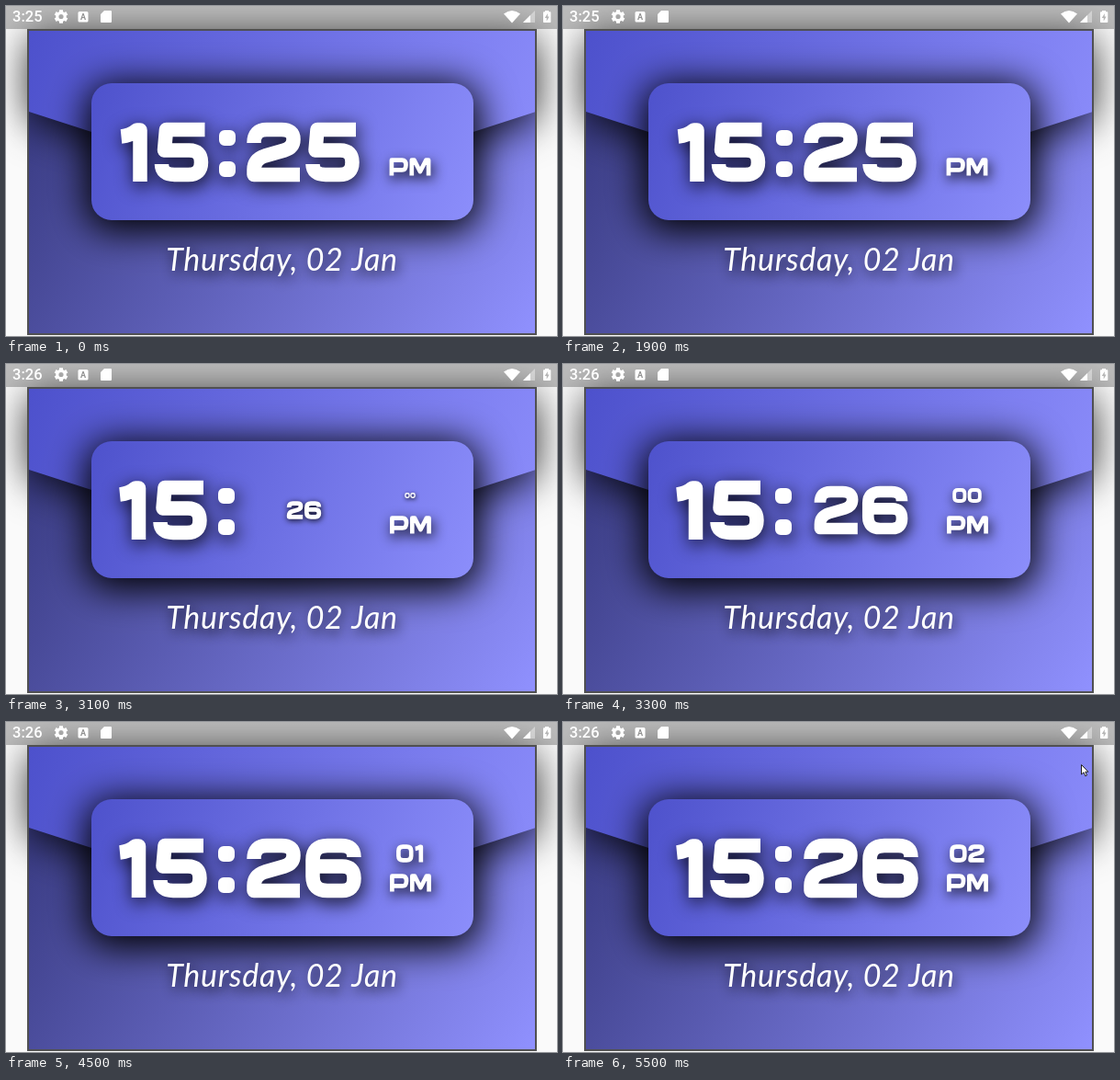
Write an HTML page with a canvas that moves like this. It is 600 px wide and 359 px high and loops after 5.7 s.

```html
<!DOCTYPE html>
<html lang="en">
<head>
<meta charset="utf-8">
<title>Clock</title>
<style>
html, body { margin: 0; width: 100%; height: 100%; overflow: hidden; background: #fafafa; }
canvas { display: block; width: 600px; height: 359px; }
</style>
</head>
<body>
<canvas id="stage" width="600" height="359"></canvas>
<script>
const W = 600, H = 359, LOOP = 5700, STEP = 100, GROW = 550;
const ctx = document.getElementById('stage').getContext('2d');

// Centre lines of the wide display letters: 64 units high, 15 thick
const GLYPHS = {
  0: [62, 'M24 7.5H38Q54 7.5 54 23V41Q54 56.5 38 56.5H24Q8 56.5 8 41V23Q8 7.5 24 7.5Z'],
  1: [33, 'M22.5 64V8H19Q12 14 2 15'],
  2: [59, 'M8 22Q8 7.5 22 7.5H38Q51 7.5 51 18Q51 27 41 30L20 36Q8 40 8 51V56.5H58'],
  5: [59, 'M55 7.5H13L11 30H38Q51 30 51 43Q51 56.5 37 56.5H22Q8 56.5 8 45'],
  6: [61, 'M53 20Q53 7.5 39 7.5H24Q8 7.5 8 23V41Q8 56.5 24 56.5H40Q53 56.5 53 43Q53 30 40 30H8'],
  7: [57, 'M1 7.5H50V12L24 64'],
  8: [60, 'M20 7.5H40Q50 7.5 50 19Q50 31 40 31H20Q10 31 10 19Q10 7.5 20 7.5ZM20 31H40Q52 31 52 44Q52 56.5 40 56.5H20Q8 56.5 8 44Q8 31 20 31Z'],
  9: [61, 'M8 44Q8 56.5 22 56.5H37Q53 56.5 53 41V23Q53 7.5 37 7.5H21Q8 7.5 8 21Q8 34 21 34H53'],
  P: [68, 'M8 64V7.5H46Q60 7.5 60 25Q60 43 46 43H8'],
  M: [77, 'M8 64V7.5H17L38.5 49L60 7.5H69V64']
};
const GAP = 5;

const TICKS = [
  { at: -30, sec: '57' }, { at: 945, sec: '58' }, { at: 1900, sec: '59' },
  { at: 2900, sec: '00' }, { at: 3950, sec: '01' }, { at: 4690, sec: '02' }
];
const MINUTE = 2900;

const POINTER_START = 4900;
const POINTER = [[594, 200], [134, 234], [400, 110], [574, 54], [568, 48], [565, 46], [564, 46]];

function setShadow(c, x, y, blur, alpha) {
  c.shadowColor = `rgba(0,0,0,${alpha})`;
  c.shadowOffsetX = x;
  c.shadowOffsetY = y;
  c.shadowBlur = blur;
}

function slope(c, x0, y0, x1, y1, from, to) {
  const g = c.createLinearGradient(x0, y0, x1, y1);
  g.addColorStop(0, from);
  g.addColorStop(1, to);
  return g;
}

function fillPath(c, d, color) {
  c.fillStyle = color;
  c.fill(new Path2D(d), 'evenodd');
}

function word(text) {
  const path = new Path2D();
  let x = 0;
  for (const ch of text) {
    const [w, d] = GLYPHS[ch];
    path.addPath(new Path2D(d), new DOMMatrix([1, 0, 0, 1, x, 0]));
    x += w + GAP;
  }
  return { path, width: x - GAP };
}

function drawWord(c, text, cx, cy, size, grow = 1) {
  const s = size * grow;
  if (s < 0.004) return;
  const { path, width } = word(text);
  c.save();
  setShadow(c, 2 * grow, 5 * grow, (size < 1 ? 14 : 20) * grow, 0.9);
  c.translate(cx, cy);
  c.scale(s, s);
  c.translate(-width / 2, -32);
  c.strokeStyle = '#fff';
  c.lineWidth = 15.5;
  c.lineJoin = 'round';
  c.stroke(path);
  c.restore();
}

function drawColon(c, x) {
  c.save();
  setShadow(c, 2, 5, 20, 0.9);
  c.fillStyle = '#fff';
  c.beginPath();
  c.roundRect(x, 135, 18, 17, 6);
  c.roundRect(x, 169, 18, 17, 6);
  c.fill();
  c.restore();
}

function drawGear(c, x, y) {
  c.save();
  c.translate(x, y);
  c.fillStyle = '#fff';
  for (let i = 0; i < 6; i++) {
    c.fillRect(-2, -7.3, 4, 4);
    c.rotate(Math.PI / 3);
  }
  c.strokeStyle = '#fff';
  c.lineWidth = 3.2;
  c.beginPath();
  c.arc(0, 0, 4.2, 0, 7);
  c.stroke();
  c.restore();
}

function drawStatus(c) {
  c.fillStyle = 'rgba(0,0,0,.25)';
  c.fillRect(0, 0, W, 25);
  drawGear(c, 60, 11.5);
  c.fillStyle = '#fff';
  c.beginPath();
  c.roundRect(78.5, 6, 11, 11.5, 1.5);
  c.fill();
  c.fillStyle = '#8f8f8f';
  c.font = '700 9px Roboto, sans-serif';
  c.textAlign = 'center';
  c.fillText('A', 84, 15);
  fillPath(c, 'M107 5H114Q115 5 115 6V17Q115 18 114 18H104Q103 18 103 17V9Z', '#fff');
  fillPath(c, 'M542 8.5Q551 1.5 560 8.5L551 18.5Z', '#fff');
  fillPath(c, 'M576 5V18H563Z', 'rgba(255,255,255,.4)');
  fillPath(c, 'M571 10V18H563Z', '#fff');
  fillPath(c, 'M587 5H591V6.3H592.5Q593.3 6.3 593.3 7V17.2Q593.3 18 592.5 18H585.8Q585 18 585 17.2V7Q585 6.3 585.8 6.3H587Z M589.8 8L586.8 13H588.7V16.5L591.6 11.5H589.8Z', '#fff');
}

function drawBack(c) {
  c.fillStyle = '#fafafa';
  c.fillRect(0, 0, W, H);
  c.fillStyle = slope(c, 25, 27, 577, 357, '#33357a', '#9091ff');
  c.fillRect(24, 26, 553, 331);

  // Envelope flap
  c.save();
  setShadow(c, 0, 8, 44, 0.85);
  fillPath(c, 'M25 27H577V115L301 204L25 115Z', slope(c, 25, 27, 577, 204, '#4d51cc', '#8c8dfb'));
  c.restore();

  c.strokeStyle = '#505052';
  c.lineWidth = 2;
  c.strokeRect(24, 26, 553, 331);
  drawStatus(c);
}

function drawCard(c) {
  // Shadow alone, cast by a slightly larger plate outside the stage
  c.save();
  setShadow(c, 0, 1006, 40, 1);
  c.beginPath();
  c.roundRect(87, 78 - 1000, 428, 161, 28);
  c.fill();
  c.restore();

  c.fillStyle = slope(c, 93, 84, 509, 233, '#4e52cc', '#8c8efb');
  c.beginPath();
  c.roundRect(93, 84, 416, 149, 22);
  c.fill();
}

function drawDate(c) {
  c.save();
  setShadow(c, 2, 5, 14, 0.85);
  c.fillStyle = '#fff';
  c.font = 'italic 400 34px Lato, sans-serif';
  c.letterSpacing = '0.7px';
  c.textAlign = 'center';
  c.fillText('Thursday, 02 Jan', 300.5, 288);
  c.restore();
}

function buildScene() {
  const layer = document.createElement('canvas');
  layer.width = W;
  layer.height = H;
  const c = layer.getContext('2d');
  drawBack(c);
  drawCard(c);
  drawDate(c);
  return layer;
}

function growth(t, start) {
  const e = Math.min(1, Math.max(0, (t - start) / GROW));
  return e * e * (3 - 2 * e);
}

function drawPointer(t) {
  if (t < POINTER_START) return;
  const i = Math.min(POINTER.length - 1, Math.floor((t - POINTER_START) / STEP));
  const [x, y] = POINTER[i];
  ctx.save();
  ctx.translate(x, y);
  const arrow = new Path2D('M.5 .5V11L3 8.8L4.8 12.8L6.5 12L4.8 8.2H8Z');
  ctx.fillStyle = '#fff';
  ctx.fill(arrow);
  ctx.strokeStyle = '#222';
  ctx.lineWidth = 1;
  ctx.stroke(arrow);
  ctx.restore();
}

const scene = buildScene();

function draw(t) {
  const late = t >= MINUTE;
  const minute = late ? '26' : '25';
  const tick = TICKS.filter(k => k.at <= t).pop();

  ctx.drawImage(scene, 0, 0);
  ctx.fillStyle = '#fff';
  ctx.font = '500 16.5px Roboto, sans-serif';
  ctx.textAlign = 'left';
  ctx.fillText('3:' + minute, 7, 17);

  drawWord(ctx, '15', late ? 170.5 : 172, 159, 1);
  drawColon(ctx, late ? 231 : 232);
  drawWord(ctx, minute, late ? 324.5 : 323.5, 159, 1, late ? growth(t, MINUTE) : 1);
  drawWord(ctx, tick.sec, 440, 143, 0.3, growth(t, tick.at));
  drawWord(ctx, 'PM', late ? 440.5 : 440, 175, 0.3);
  drawPointer(t);
}

const begin = performance.now();
function loop() {
  const t = (performance.now() - begin) % LOOP;
  draw(Math.floor(t / STEP) * STEP);
  requestAnimationFrame(loop);
}
loop();
</script>
</body>
</html>
```
